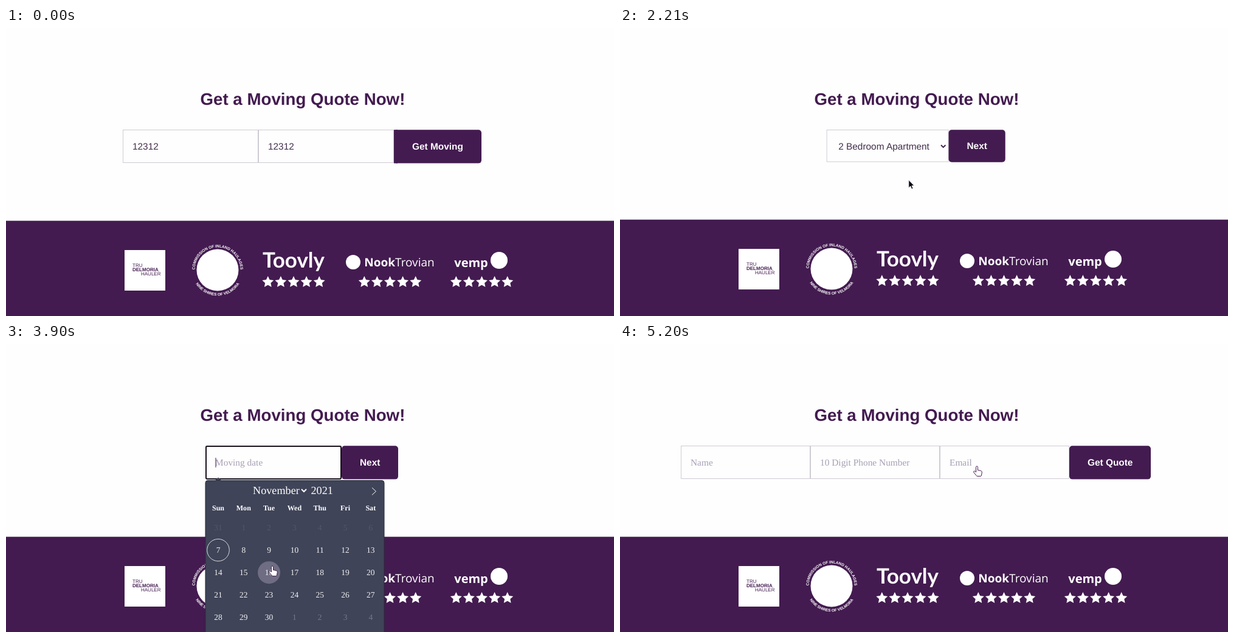
These frames come from a looping animation (1000 by 476 pixels, 5.33 s). An HTML page:

```html
<!DOCTYPE html>
<html lang="en">
<head>
<meta charset="utf-8">
<title>Moving quote form</title>
<style>
  html, body { margin: 0; height: 100%; overflow: hidden; background: #fefefe; }
  svg { display: block; width: 100vw; height: 100vh; }
  text { font: 15.4px "Liberation Sans", Arial, sans-serif; fill: #43304c; text-rendering: geometricPrecision; }
  .title { font-size: 27.7px; font-weight: bold; fill: #431b50; }
  .button { font-weight: bold; fill: #fff; }
  .hint { font-family: "Liberation Serif", serif; fill: #a79fb4; }
  .month { font: 18.2px "Liberation Serif", serif; fill: #fff; }
  .week { font: bold 12.1px "Liberation Serif", serif; fill: #fff; text-anchor: middle; }
  .day { font: 13.5px "Liberation Serif", serif; fill: #f2f2f2; text-anchor: middle; }
  .badge { font-size: 8px; fill: #431b50; }
  .ring { font-size: 6.4px; font-weight: bold; fill: #fff; text-anchor: middle; }
  .brand { fill: #fff; text-anchor: middle; }
  .bold { font-weight: bold; }
</style>
</head>
<body>
<svg viewBox="0 0 1000 476" preserveAspectRatio="none">
  <defs>
    <path id="ringTop" d="M310.5 400a37.5 37.5 0 0 1 75 0"/>
    <path id="ringBottom" d="M305.5 400a42.5 42.5 0 0 0 85 0"/>
  </defs>
  <text class="title" x="319.5" y="126.7">Get a Moving Quote Now!</text>
  <g id="footer"></g>
  <g id="form"></g>
</svg>
<script>
const LOOP = 5330, STEP = 130;
const PURPLE = '#431b50', MID = '#371444', DARK = '#2c0c38';
const footer = document.getElementById('footer');
const form = document.getElementById('form');

const text = (cls, x, y, str, more = '') => `<text class="${cls}" x="${x}" y="${y}" ${more}>${str}</text>`;
const stroke = (d, color = '#fff', width = 1) =>
  `<path d="${d}" fill="none" stroke="${color}" stroke-width="${width}"/>`;

function field(x, w, str, cls = 'hint', h = 54, pad = 16) {
  return `<rect x="${x + .5}" y="168.5" width="${w - 1}" height="${h}" fill="#fefefe" stroke="#cfcbd4"/>` +
    text(cls, x + pad, 201, str);
}

function button(x, w, str, fill = PURPLE, h = 55.4) {
  return `<rect x="${x}" y="168.2" width="${w}" height="${h}" rx="5" fill="${fill}"/>` +
    text('button', x + 30, h < 55 ? 200 : 201, str);
}

function stars(cx) {
  let d = '';
  for (let s = -2; s <= 2; s++) {
    for (let i = 0; i < 10; i++) {
      const r = i % 2 ? 4.8 : 10, a = i * Math.PI / 5;
      const x = cx + s * 21.1 + r * Math.sin(a), y = 420 - r * Math.cos(a);
      d += (i ? 'L' : 'M') + x.toFixed(1) + ' ' + y.toFixed(1);
    }
    d += 'Z';
  }
  return `<path d="${d}" fill="#fff"/>`;
}

const ring = (id, str) =>
  `<text class="ring"><textPath href="#${id}" startOffset="50%">${str}</textPath></text>`;

footer.innerHTML =
  `<rect y="318.6" width="1000" height="170" fill="${PURPLE}"/>` +
  '<rect x="195" y="367" width="67" height="67" fill="#fff"/>' +
  text('badge', 208, 395, 'TRU') + text('badge bold', 208, 402, 'DELMORIA') + text('badge', 222, 409, 'HAULER') +
  '<circle cx="348" cy="400" r="34.5" fill="#fff"/>' +
  ring('ringTop', 'COMMISSION OF INLAND HAULAGES') + ring('ringBottom', 'NINE SHIRES OF VELMORA') +
  text('brand bold', 473, 396, 'Toovly', 'style="font-family:Lato,sans-serif;font-size:35px"') + stars(473) +
  '<circle cx="571" cy="387" r="12" fill="#fff"/>' +
  text('brand', 647, 394, '<tspan class="bold">Nook</tspan>Trovian', 'style="font-family:\'Open Sans\',sans-serif;font-size:19px"') +
  stars(631.5) +
  text('brand bold', 765, 395, 'vemp', 'style="font-family:\'Open Sans\',sans-serif;font-size:20px"') +
  '<circle cx="811" cy="384" r="14" fill="#fff"/>' + stars(782.5);

// Month grid: Sunday 31 October to Saturday 11 December.
function calendar(t) {
  const p = 1 - (1 - Math.min(1, (t - 3470) / 300)) ** 4;
  let s = `<g opacity="${p}" transform="translate(0 ${-19.3 * (1 - p)})">` +
    '<path d="M344 225.5l5-5 5 5z" fill="#3f4458"/>' +
    '<rect x="328" y="225.5" width="294" height="290" rx="4" fill="#3f4458" stroke="#272a38"/>' +
    text('month', 406, 248, 'November') + text('month', 501.5, 248, '2021') +
    stroke('M486 240l4 4 4-4', '#fff', 2) + stroke('M602 237.5l6.5 6-6.5 6');
  ['Sun', 'Mon', 'Tue', 'Wed', 'Thu', 'Fri', 'Sat'].forEach((name, i) => {
    s += text('week', 349 + 41.8 * i, 275, name);
  });
  for (let i = 0; i < 42; i++) {
    const x = 349 + 41.8 * (i % 7), y = 303.5 + 37.1 * Math.floor(i / 7);
    const day = i < 1 ? 31 : i > 30 ? i - 30 : i;
    const alpha = i < 7 ? .1 : i > 30 ? .3 : 1;
    if (i === 7) s += `<circle cx="${x}" cy="${y}" r="18.3" fill="none" stroke="#ddd"/>`;
    if (i === 16 && t >= 3900) s += `<circle cx="${x}" cy="${y}" r="18.5" fill="#6f6d83"/>`;
    s += text('day', x, y + 4.5, day, `opacity="${alpha}"`);
  }
  return s + '</g>';
}

function datePage(t) {
  const open = t >= 3510 && t < 4290, chosen = t >= 4290;
  let s = field(328, 224, chosen ? '2021-11-16' : 'Moving date', chosen ? '' : 'hint') +
    button(552, 93, 'Next', t >= 4940 ? DARK : PURPLE);
  if (t >= 3510) {
    const x = chosen ? 421.5 : 345;
    s += '<rect x="329" y="169" width="222" height="54" rx="2" fill="none" stroke="#17101c" stroke-width="2"/>' +
      stroke(`M${x} 188v16`, PURPLE);
  }
  return s + (open ? calendar(t) : '');
}

function page(t) {
  if (t < 780) {
    const fill = t >= 520 ? DARK : PURPLE;
    return field(192, 223, '12312', '') + field(415, 223, '12312', '') +
      button(638, 144, 'Get Moving', fill) + `<path d="M638 168.2h6v55.4h-6z" fill="${fill}"/>`;
  }
  if (t < 3120) {
    return field(339.7, 201, t < 2080 ? 'Select move size...' : '2 Bedroom Apartment', '', 52.5, 19.5) +
      stroke('M528 193.5l3.7 3.7 3.7-3.7', PURPLE, 1.8) +
      button(540.5, 93.2, 'Next', t < 2600 ? PURPLE : t < 2860 ? MID : DARK, 53.5);
  }
  if (t < 5200) return datePage(t);
  return field(100, 213, 'Name') + field(313, 213, '10 Digit Phone Number') +
    field(526, 213, 'Email') + button(739, 134, 'Get Quote');
}

const pointers = {
  arrow: '<path d="M0 0V13L3 10.2 5 15 7.2 14 5.2 9.5H9.2Z" fill="#0a0510" stroke="#fff" stroke-width=".8"/>',
  hand: '<path d="M-1.5 1.5a1.5 1.5 0 0 1 3 0v5l5 1q2 .6 1.8 2.6l-.8 5q-.3 1.4-1.6 1.4h-5q-1.2 0-2-1.2l-4.2-5.4q-.5-1.6 1-2 1.2 0 2.8 2z" fill="#fff" stroke="#431b50"/>',
  beam: stroke('M-2.5-7.5q2.5 0 2.5 2V5.5q0 2-2.5 2M2.5-7.5q-2.5 0-2.5 2M0 5.5q0 2 2.5 2', '#4b4654')
};

// Pointer path: time, hot spot, shape from that time on.
const path = [
  [130, 520, 250, 'arrow'], [520, 692, 196, 'hand'], [910, 692, 196, 'arrow'],
  [1560, 458, 191, 'arrow'], [1950, 458, 191, 'arrow'], [2080, 452, 262, 'arrow'],
  [2600, 598, 193, 'hand'], [3120, 598, 193, 'hand'], [3250, 565, 197, 'arrow'],
  [3510, 402, 206, 'beam'], [3640, 406, 226, 'beam'], [3770, 423, 315, 'hand'],
  [3900, 438, 367, 'hand'], [4160, 438, 367, 'hand'], [4290, 452, 342, 'arrow'],
  [4420, 477, 304, 'arrow'], [4680, 477, 304, 'arrow'], [4940, 587, 202, 'hand'],
  [LOOP, 587, 202, 'hand']
];

function pointer(t) {
  if (t < path[0][0]) return '';
  const i = path.findIndex(k => k[0] > t);
  const [t0, x0, y0, shape] = path[i - 1], [t1, x1, y1] = path[i];
  const u = (t - t0) / (t1 - t0), e = u * u * (3 - 2 * u);
  return `<g transform="translate(${x0 + (x1 - x0) * e} ${y0 + (y1 - y0) * e})">${pointers[shape]}</g>`;
}

let last = -1;
function draw(now) {
  const t = Math.floor(now % LOOP / STEP) * STEP;
  if (t !== last) {
    last = t;
    footer.setAttribute('transform', `translate(0 ${t >= 780 && t < 3120 ? -1.9 : 0})`);
    form.innerHTML = page(t) + pointer(t);
  }
  requestAnimationFrame(draw);
}
draw(performance.now());
</script>
</body>
</html>
```
